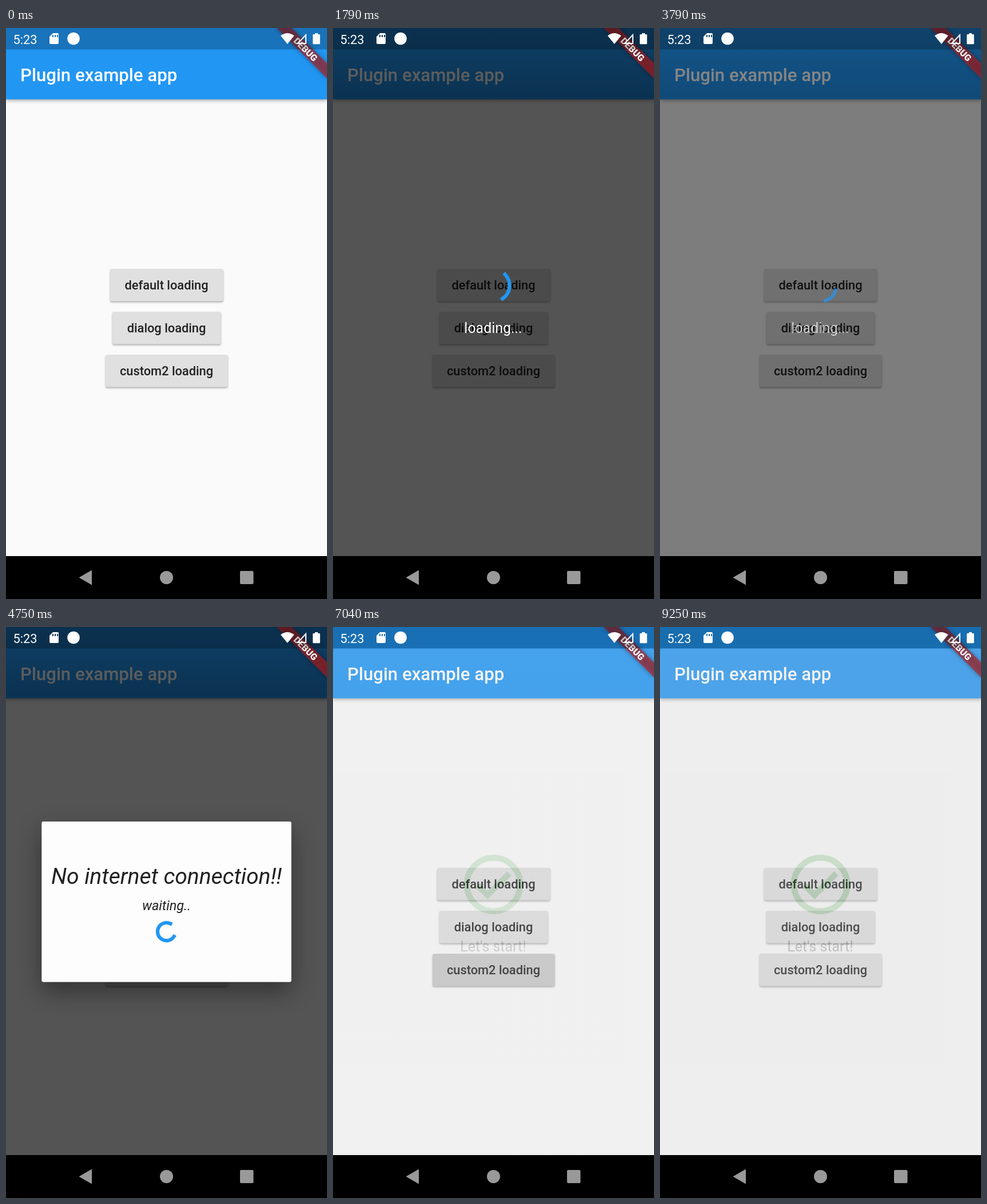
These frames come from a looping animation (561x998 px, 9.58 s). An HTML page:

```html
<!DOCTYPE html>
<html lang="en">
<head>
<meta charset="utf-8">
<title>Loading dialogs</title>
<style>
  html, body { margin: 0; width: 100%; height: 100%; overflow: hidden; background: #000; }
  svg { display: block; width: 100vw; height: 100vh; font-family: Roboto, sans-serif; }
  .mid { text-anchor: middle; }
  .bar { filter: drop-shadow(0 2px 3px rgba(0, 0, 0, .35)); }
  .button { fill: #e0e0e0; filter: drop-shadow(0 2px 1.5px rgba(0, 0, 0, .3)); }
  .label { font-size: 21.8px; font-weight: 500; fill: #212121; }
  .card { fill: #fdfdfd; filter: drop-shadow(0 16px 20px rgba(0, 0, 0, .4)); }
  .ink { fill: #212121; }
  .italic { font-style: italic; }
  .spin { fill: none; stroke: #2196f3; stroke-width: 6.2; stroke-linecap: square; }
  .ribbon { fill: rgba(183, 28, 28, .63); filter: drop-shadow(0 0 4px rgba(0, 0, 0, .5)); }
</style>
</head>
<body>
<svg viewBox="0 0 561 998" preserveAspectRatio="none">
  <linearGradient id="shade" x2="0" y2="1">
    <stop offset="0" stop-opacity=".57"/>
    <stop offset=".125" stop-opacity=".665"/>
  </linearGradient>

  <rect width="561" height="923" fill="#fafafa"/>
  <rect class="bar" width="561" height="124.7" fill="#2196f3"/>
  <text x="25" y="92.5" font-size="31.16" font-weight="500" fill="#fff">Plugin example app</text>
  <g id="buttons"></g>

  <rect id="barrier" width="561" height="923" fill="url(#shade)"/>

  <g class="dialog">
    <path class="spin"/>
    <text class="mid" x="280" y="532.5" font-size="24.9" fill="#fff">loading...</text>
  </g>
  <g class="dialog">
    <rect class="card" x="62.3" y="340" width="436.4" height="280.5" rx="3"/>
    <text class="mid ink italic" x="280.5" y="448.5" font-size="39">No internet connection!!</text>
    <text class="mid ink italic" x="280.5" y="495" font-size="23.4">waiting..</text>
    <path class="spin"/>
  </g>
  <g class="dialog">
    <rect y="37.5" width="561" height="885.5" rx="3" fill="#fdfdfd"/>
    <g transform="translate(280.5 450) scale(5.19)">
      <circle r="9" fill="none" stroke="#4caf50" stroke-width="2"/>
      <path d="M4.59-4.42L-2 2.17l-2.59-2.58L-6 1l4 4 8-8z" fill="#4caf50"/>
    </g>
    <text class="mid ink" x="280" y="567" font-size="24.9">Let's start!</text>
  </g>

  <g transform="translate(561 0) rotate(45)">
    <rect class="ribbon" x="-62.3" y="43.6" width="124.7" height="18.7"/>
    <text class="mid" y="58.6" font-size="15.9" font-weight="900" fill="#fff">DEBUG</text>
  </g>

  <!-- status bar -->
  <rect width="561" height="37.5" opacity=".23"/>
  <g fill="#fff">
    <text x="12.5" y="27.5" font-size="21.8">5:23</text>
    <path fill-rule="evenodd" d="M82 9h8a2 2 0 0 1 2 2v15a2 2 0 0 1-2 2H78a2 2 0 0 1-2-2V15zM81 12v4h2v-4zm4 0v4h2v-4zm4 0v4h2v-4z"/>
    <circle cx="118" cy="18.5" r="10.8"/>
    <path d="M480 13.5q11.8-9 23.6 0L491.8 28z"/>
    <path d="M524 12v15h-14z" fill="none" stroke="#fff" stroke-width="2"/>
    <path d="M540 9h5v2h2.5a1.3 1.3 0 0 1 1.3 1.3v14.7a1.3 1.3 0 0 1-1.3 1.3h-10a1.3 1.3 0 0 1-1.3-1.3V12.3a1.3 1.3 0 0 1 1.3-1.3h2.5z"/>
  </g>

  <!-- navigation bar -->
  <rect y="923" width="561" height="75"/>
  <g fill="#999">
    <path d="M127.5 960.5L150 947.5v26z"/>
    <circle cx="280.5" cy="960.5" r="11.5"/>
    <rect x="409" y="949" width="23.5" height="23" rx="2"/>
  </g>
</svg>
<script>
const LOOP = 9580, LAST = 9250, FADE = 250;

const buttons = [
  { name: 'default loading', x: 182, y: 421, w: 197.5 },
  { name: 'dialog loading', x: 186, y: 496, w: 189.5 },
  { name: 'custom2 loading', x: 174, y: 571, w: 213.5 },
];
document.getElementById('buttons').innerHTML = buttons.map(({ name, x, y, w }) => {
  const box = `x="${x}" y="${y}" width="${w}" height="56.5" rx="3"`;
  return `<rect class="button" ${box}/><rect class="press" ${box}/>
    <text class="label mid" x="280.5" y="${y + 36}">${name}</text>`;
}).join('');

// Times in ms: button tap, dialog shown, dialog dismissed
const dialogs = [
  { tap: 1380, show: 1540, hide: 3710, spin: { cy: 450, r: 28, start: 1638, period: 1017 } },
  { tap: 4130, show: 4300, hide: 6306, spin: { cy: 532.5, r: 15.6, start: 4363, period: 967 } },
  { tap: 6880, show: 7000, hide: 9050 },
];
const groups = document.querySelectorAll('.dialog');
const presses = document.querySelectorAll('.press');
const barrier = document.getElementById('barrier');

const clamp = v => Math.min(1, Math.max(0, v));
const smooth = v => v * v * (3 - 2 * v);
const ramp = (t, from, length) => clamp((t - from) / length);
const pulse = (t, from, to, length) => Math.min(ramp(t, from, length), 1 - ramp(t, to, length));

// cubic-bezier(.4, 0, .2, 1)
function ease(x) {
  let lo = 0, hi = 1;
  for (let i = 0; i < 20; i++) {
    const s = (lo + hi) / 2, u = 1 - s;
    if (1.2 * s * u * u + 0.6 * s * s * u + s ** 3 < x) lo = s; else hi = s;
  }
  return smooth(lo);
}

// The head runs ahead in the first half of a turn, the tail catches up in the second
function arc(t, { cy, r, start, period }) {
  const turns = Math.max(0, (t - start) / period);
  const step = Math.floor(turns), p = turns - step;
  const head = ease(clamp(p * 2)) * 270, tail = ease(clamp(p * 2 - 1)) * 270;
  const from = -90 + tail + p * 306 - step * 144;
  const sweep = Math.max(head - tail, 0.1);
  const point = a => {
    const rad = a * Math.PI / 180;
    return `${280.5 + r * Math.cos(rad)} ${cy + r * Math.sin(rad)}`;
  };
  return `M${point(from)}A${r} ${r} 0 ${+(sweep > 180)} 1 ${point(from + sweep)}`;
}

function draw(now) {
  const t = Math.min(now % LOOP, LAST);
  let dim = 0;
  dialogs.forEach(({ tap, show, hide, spin }, i) => {
    const alpha = pulse(t, show, hide, FADE);
    dim = Math.max(dim, smooth(alpha));
    groups[i].style.opacity = alpha;
    presses[i].style.opacity = 0.1 * pulse(t, tap, show + 50, 150);
    if (spin) groups[i].querySelector('.spin').setAttribute('d', arc(t, spin));
  });
  barrier.style.opacity = dim;
}

const begin = performance.now();
function tick() {
  draw(performance.now() - begin);
  requestAnimationFrame(tick);
}
tick();
</script>
</body>
</html>
```
